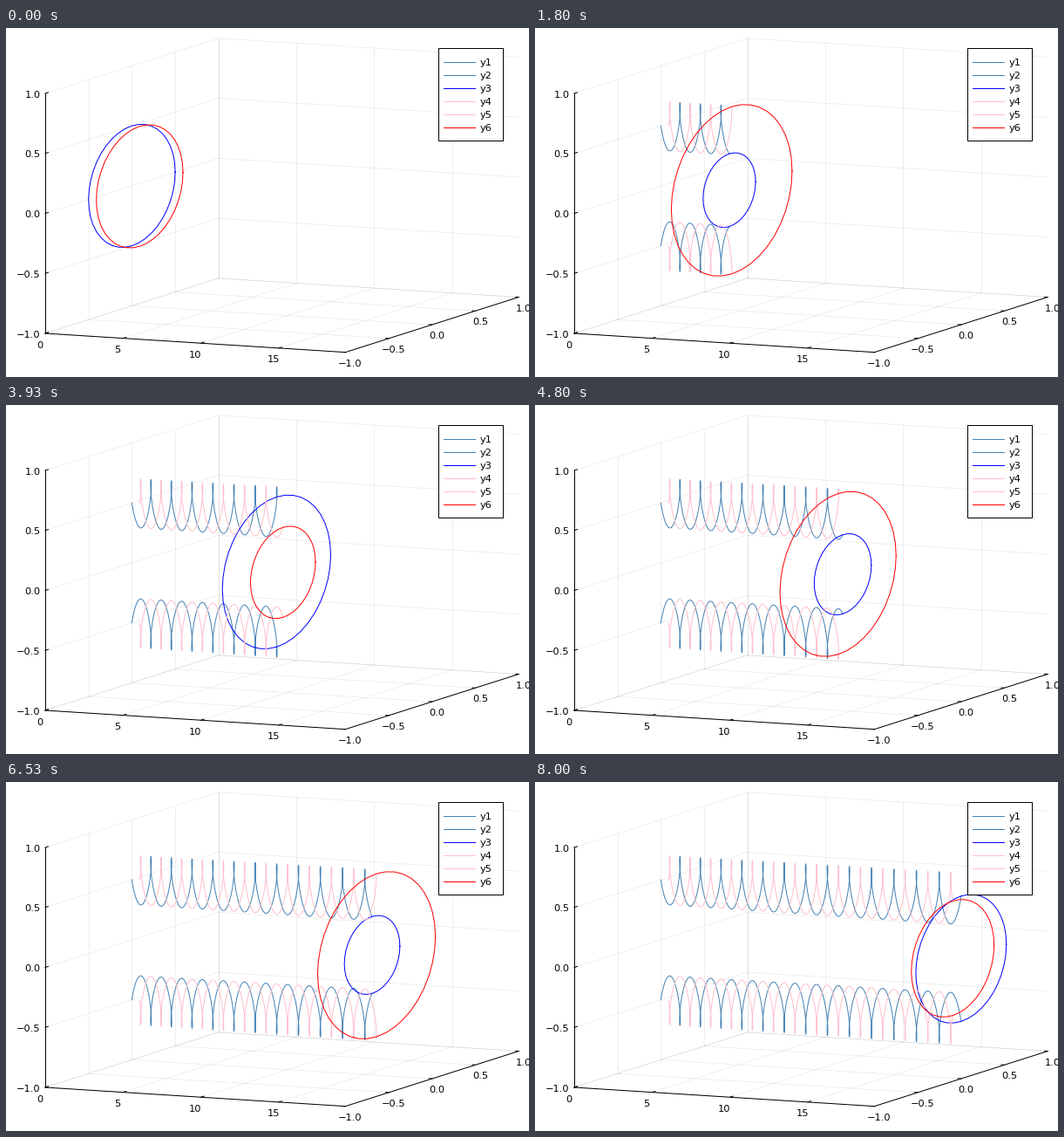
These frames come from a looping animation (600 by 400 pixels, 8.07 s). A matplotlib script:

```python
import numpy as np
import matplotlib.pyplot as plt
from matplotlib.animation import FuncAnimation
from matplotlib.patches import Rectangle

W, H, DPI = 600, 400, 100
LOOP, TICK = 8070, 30          # ms
POSES, FPS = 121, 15
DT = 0.001
SUB, SKIP = 500, 10            # Euler steps per pose, steps per stored point
X_MAX = 19.28
PX = 72 / DPI                  # one pixel in points


def proj(x, y, z):
    """Orthographic view: data to pixel coordinates."""
    return (45 + 17.86 * x + 99.4 * (y + 1),
            350 + 1.124 * x - 31.6 * (y + 1) - 137.5 * (z + 1))


def leapfrog():
    """Two vortex pairs, stepped by explicit Euler; rows of x1, r1, x2, r2."""
    k = 1 / (2 * np.pi)
    mid, gap, dr = 0.25, -0.5, 0.0
    rows = []
    for n in range(SUB * (POSES - 1) + 1):
        if n % SKIP == 0:
            rows.append((mid + gap / 2, (1 + dr) / 2,
                         mid - gap / 2, (1 - dr) / 2))
        a, b = 1 / (1 - dr * dr), 1 / (1 + gap * gap)
        s2 = gap * gap + dr * dr
        v_mid = k * (a + b)
        v_gap = -2 * k * dr * (a + 1 / s2)
        v_dr = 2 * k * gap * (1 / s2 - b)
        mid += DT * v_mid
        gap += DT * v_gap
        dr += DT * v_dr
    return np.array(rows)


path = leapfrog()

fig = plt.figure(figsize=(W / DPI, H / DPI), dpi=DPI, facecolor="white")
ax = fig.add_axes([0, 0, 1, 1])
ax.set_xlim(0, W)
ax.set_ylim(H, 0)
ax.axis("off")


def line(points, color, width=1.0, **kw):
    xs, ys = zip(*points)
    return ax.plot(xs, ys, color=color, lw=width * PX, **kw)[0]


def label(x, y, s, ha="center"):
    ax.text(x, y, s.replace("-", "\u2212"), ha=ha, va="center_baseline",
            fontsize=11.4 * PX, family="DejaVu Sans", color="black", zorder=9)


def grid(*corners):
    line([proj(*c) for c in corners], "black", 0.6, alpha=0.1, zorder=1)


x_ticks = (0, 5, 10, 15)
u_ticks = (-1, -0.5, 0, 0.5, 1)

for x in x_ticks:
    grid((x, -1, -1), (x, 1, -1))
    grid((x, 1, -1), (x, 1, 1))
for u in u_ticks:
    grid((0, u, -1), (X_MAX, u, -1))
    grid((0, u, -1), (0, u, 1))
    grid((0, -1, u), (0, 1, u))
    grid((0, 1, u), (X_MAX, 1, u))

for a, b in (((0, -1, 1), (0, -1, -1)), ((0, -1, -1), (X_MAX, -1, -1)),
             ((X_MAX, -1, -1), (X_MAX, 1, -1))):
    line([proj(*a), proj(*b)], "black", zorder=2)


def tick(p, dx, dy):
    line([p, (p[0] + dx, p[1] + dy)], "black", zorder=2)


for x in x_ticks:
    p = proj(x, -1, -1)
    tick(p, 3.5, -1.1)
    label(p[0] - 6.3, p[1] + 12.6, str(x))
for u in u_ticks:
    p = proj(X_MAX, u, -1)
    tick(p, -3.5, -0.2)
    label(p[0] + 5.7, p[1] + 12.2, f"{u:.1f}")
    p = proj(0, -1, u)
    tick(p, 3.5, -1.1)
    label(39.7, p[1] + 0.6, f"{u:.1f}", ha="right")

# Legend
ax.add_patch(Rectangle((496, 23), 74, 106, fc="white", ec="black",
                       lw=PX, zorder=7))
colors = ("steelblue", "steelblue", "blue", "pink", "pink", "red")
for i, c in enumerate(colors):
    y = 39 + 15 * i
    line([(502, y), (538, y)], c, zorder=8)
    label(544, y + 0.2, f"y{i + 1}", ha="left")


def pair(trail, ring, z):
    """Upper trail, lower trail and ring of one vortex pair."""
    arts = [line([(0, 0)], c, zorder=z) for c in (trail, trail, ring)]
    arts[2].set_zorder(z + 0.5)
    return arts


pairs = [pair("steelblue", "blue", 3), pair("pink", "red", 4)]
angle = np.linspace(0, 2 * np.pi, 41)


def draw(i):
    # pose times are rounded to 10 ms
    t = i * TICK + 20
    pose = min(int((t + 5) * FPS / 1000), POSES - 1)
    end = pose * SUB // SKIP + 1
    for j, (top, low, ring) in enumerate(pairs):
        x, r = path[:end, 2 * j], path[:end, 2 * j + 1]
        top.set_data(*proj(x, 0, r))
        low.set_data(*proj(x, 0, -r))
        ring.set_data(*proj(x[-1], r[-1] * np.cos(angle),
                            r[-1] * np.sin(angle)))
    return [a for p in pairs for a in p]


anim = FuncAnimation(fig, draw, frames=LOOP // TICK, interval=TICK,
                     repeat=True, repeat_delay=0, blit=False)
plt.show()
```
